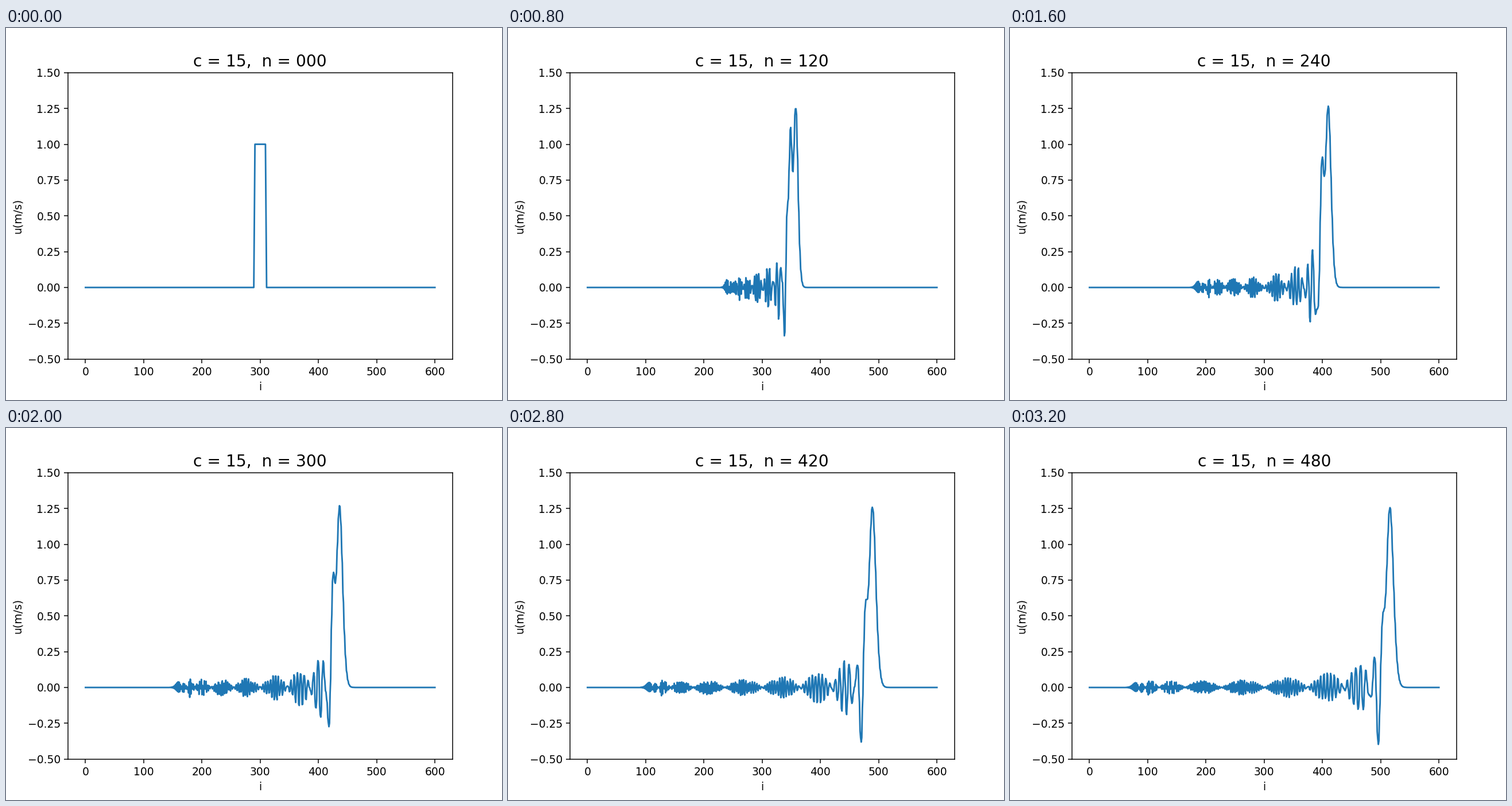
Write a matplotlib script that moves like this. It is 864 by 648 pixels and loops after 3400 ms.

```python
import numpy as np
import matplotlib.pyplot as plt
from matplotlib.animation import FuncAnimation

SPEED = 15            # m/s
COURANT = 0.45        # SPEED * dt / dx
CENTRE, HALF_WIDTH = 300, 10
STEPS_PER_FRAME = 30
FRAMES = 17

plt.rcParams["font.family"] = "DejaVu Sans"
cells = np.arange(601)


def pulse(shift):
    """Unit box moved by shift cells, worth one half exactly on its edges."""
    distance = np.abs(cells - CENTRE - shift)
    return np.heaviside(HALF_WIDTH - distance, 0.5)


def leapfrog(steps):
    """Advection, centred in time and space, with fixed ends."""
    history = np.zeros((steps + 1, cells.size))
    history[0], history[1] = pulse(0), pulse(COURANT)
    for n in range(1, steps):
        slope = history[n, 2:] - history[n, :-2]
        history[n + 1, 1:-1] = history[n - 1, 1:-1] - COURANT * slope
    return history


waves = leapfrog(STEPS_PER_FRAME * (FRAMES - 1))

fig, ax = plt.subplots(figsize=(6.4, 4.8), dpi=135)
line, = ax.plot(cells, waves[0])
ax.set_xlim(-30, 630)
ax.set_ylim(-0.5, 1.5)
ax.set_xlabel("i")
ax.set_ylabel("u(m/s)")
title = ax.set_title("", fontsize=15)


def draw(frame):
    n = frame * STEPS_PER_FRAME
    line.set_ydata(waves[n])
    title.set_text(f"c = {SPEED},  n = {n:03d}")
    return line, title


animation = FuncAnimation(fig, draw, frames=FRAMES, interval=200,
                          init_func=lambda: draw(0), repeat=True)
plt.show()
```
